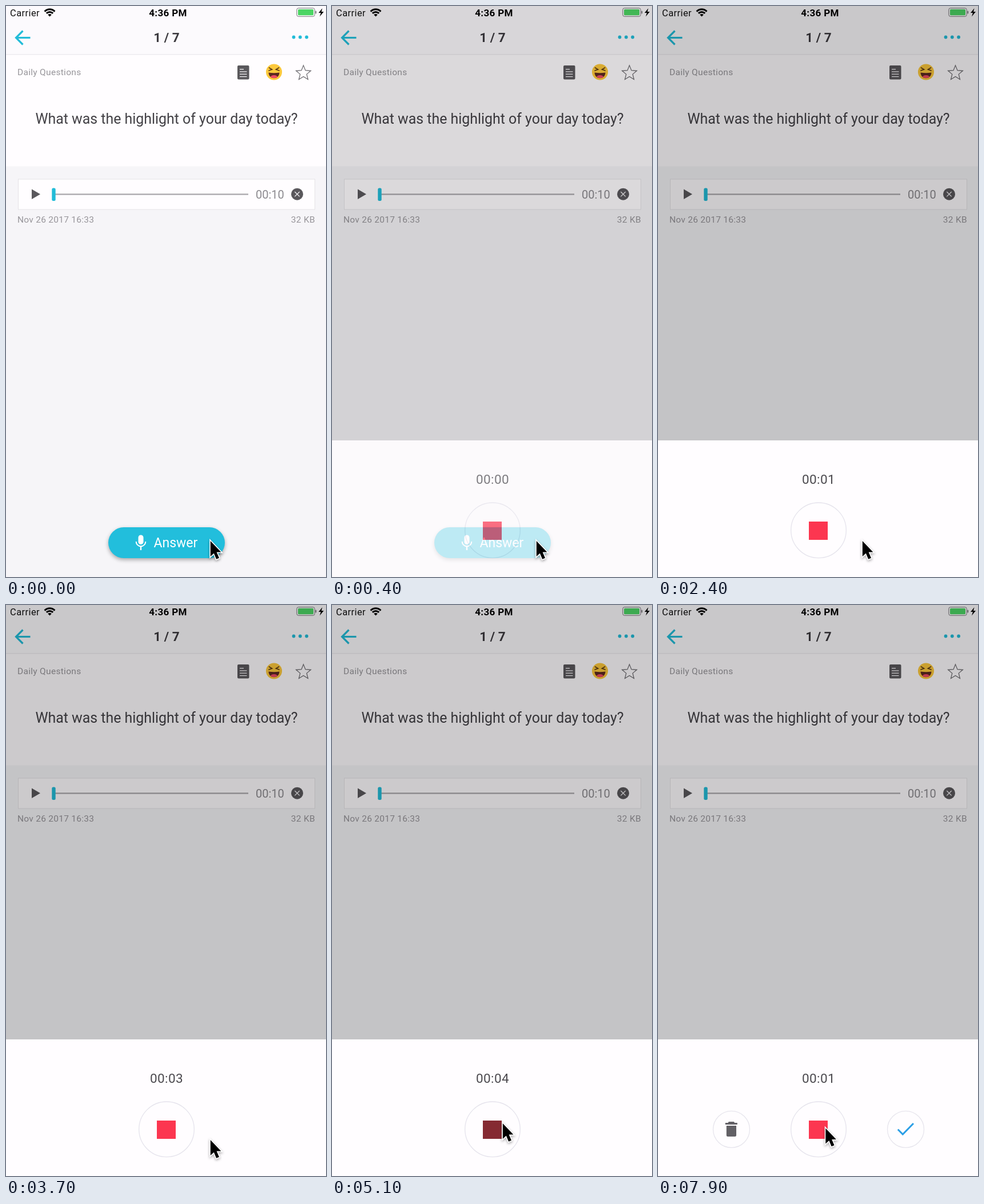
An HTML page with a canvas for the animation above (8000 ms loop, 560 by 999 pixels).

```html
<!DOCTYPE html>
<html lang="en">
<head>
<meta charset="utf-8">
<title>Voice answer</title>
<style>
html, body { margin: 0; width: 100%; height: 100%; overflow: hidden; background: #f6f5f8; }
canvas { display: block; width: 560px; height: 999px; }
</style>
</head>
<body>
<canvas id="stage" width="560" height="999"></canvas>
<script>
const W = 560, H = 999, LOOP = 8000;
const CYAN = '#22bcd8', DARK = '#5a585c', RED = '#fc3650';
const stage = document.getElementById('stage').getContext('2d');

function layer() {
  const el = document.createElement('canvas');
  el.width = W;
  el.height = H;
  return el.getContext('2d');
}
const page = layer(), modal = layer();
let c = page;

function rect(x, y, w, h, color) {
  c.fillStyle = color;
  c.fillRect(x, y, w, h);
}
function round(x, y, w, h, r, color) {
  c.beginPath();
  c.roundRect(x, y, w, h, r);
  c.fillStyle = color;
  c.fill();
}
function disc(x, y, r, color) {
  c.beginPath();
  c.arc(x, y, r, 0, Math.PI * 2);
  c.fillStyle = color;
  c.fill();
}
function ring(x, y, r, color, width) {
  c.beginPath();
  c.arc(x, y, r, 0, Math.PI * 2);
  c.strokeStyle = color;
  c.lineWidth = width;
  c.stroke();
}
function trace(points) {
  c.beginPath();
  points.forEach(([x, y]) => c.lineTo(x, y));
}
function poly(points, color) {
  trace(points);
  c.closePath();
  c.fillStyle = color;
  c.fill();
}
function line(points, color, width) {
  trace(points);
  c.strokeStyle = color;
  c.lineWidth = width;
  c.stroke();
}
function text(str, x, y, size, color, { align = 'left', weight = 400, gap = 0 } = {}) {
  c.font = `${weight} ${size}px Roboto, Inter, sans-serif`;
  c.letterSpacing = gap + 'px';
  c.textAlign = align;
  c.fillStyle = color;
  c.fillText(str, x, y);
}

function statusBar() {
  text('Carrier', 7, 17.5, 16.5, '#111', { gap: 0.4 });
  // wifi
  c.save();
  c.beginPath();
  c.moveTo(76.5, 18.5);
  c.lineTo(60.5, 2.5);
  c.lineTo(92.5, 2.5);
  c.clip();
  ring(76.5, 18, 12.2, '#000', 3);
  ring(76.5, 18, 7.6, '#000', 3);
  disc(76.5, 18, 4, '#000');
  c.restore();
  text('4:36 PM', 283.5, 17.5, 17, '#000', { align: 'center', weight: 600, gap: 0.35 });
  // battery
  c.beginPath();
  c.roundRect(508.8, 3.7, 31.4, 14.6, 3);
  c.strokeStyle = '#77757a';
  c.lineWidth = 1;
  c.stroke();
  round(511, 5.8, 27, 10.4, 1.5, '#4cd564');
  round(541.4, 8.5, 1.8, 5, 1, '#77757a');
  poly([[553.5, 4], [547, 12], [551, 12], [549, 18.5], [556, 10], [552, 10]], '#000');
}

function header() {
  rect(0, 0, W, 85, '#fcfafd');
  rect(0, 84.5, W, 1, '#e2e0e4');
  statusBar();
  line([[42.5, 55.5], [18, 55.5]], CYAN, 3.2);
  line([[29.5, 43.5], [17.5, 55.5], [29.5, 67.5]], CYAN, 3.2);
  text('1 / 7', 281, 63, 22.5, '#3c3a3f', { align: 'center', weight: 600 });
  for (let i = 0; i < 3; i++) disc(503.5 + i * 11.3, 54.5, 2.9, CYAN);
}

function emoji(x, y) {
  disc(x, y, 14, '#fdc93c');
  c.lineCap = 'round';
  for (const s of [-1, 1])
    line([[x + s * 8.5, y - 7.5], [x + s * 3.5, y - 4.5], [x + s * 9, y - 2.5]], '#5b3a16', 1.7);
  c.lineCap = 'butt';
  c.save();
  c.beginPath();
  c.moveTo(x - 9.5, y + 1);
  c.quadraticCurveTo(x, y + 2.5, x + 9.5, y + 1);
  c.bezierCurveTo(x + 9, y + 14, x - 9, y + 14, x - 9.5, y + 1);
  c.fillStyle = '#5c2a20';
  c.fill();
  c.clip();
  c.beginPath();
  c.ellipse(x, y + 10, 6.5, 4.5, 0, 0, Math.PI * 2);
  c.fillStyle = '#ee4a62';
  c.fill();
  c.restore();
}

function star(x, y) {
  const pts = [];
  for (let i = 0; i < 10; i++) {
    const r = i % 2 ? 6 : 13.6, a = i * Math.PI / 5 - Math.PI / 2;
    pts.push([x + r * Math.cos(a), y + r * Math.sin(a)]);
  }
  trace(pts);
  c.closePath();
  c.strokeStyle = '#68666b';
  c.lineWidth = 1.2;
  c.stroke();
}

function question() {
  rect(0, 85.5, W, 195, '#fffdff');
  text('Daily Questions', 20, 121, 15.5, '#97959a', { gap: 0.3 });
  round(405, 104, 20.5, 24.5, 2, DARK);
  [110, 114.3, 118.6, 122.9].forEach((y, i) => rect(409, y, i ? 12.5 : 7, 1.3, '#f4f2f5'));
  emoji(469, 115.5);
  star(520.5, 117.5);
  text('What was the highlight of your day today?', 281, 206, 24.9, '#434146', { align: 'center' });
}

function player() {
  rect(21, 302.5, 520, 54, '#e5e3e7');
  rect(22, 303.5, 518, 52, '#fffdff');
  poly([[45, 320.5], [45, 338], [60, 329.2]], DARK);
  rect(84, 328.3, 340, 2.3, '#aaa8ac');
  round(80.3, 318.5, 6.4, 22.5, 2.5, CYAN);
  text('00:10', 437, 336.5, 20, '#8b898e');
  disc(509.5, 329.2, 10.5, DARK);
  line([[505.3, 325], [513.7, 333.4]], '#f4f2f5', 1.3);
  line([[513.7, 325], [505.3, 333.4]], '#f4f2f5', 1.3);
  text('Nov 26 2017 16:33', 20, 379, 15.5, '#97959a', { gap: 0.27 });
  text('32 KB', 541, 379, 15.5, '#97959a', { align: 'right', gap: 0.3 });
}

function answerButton() {
  c.save();
  c.shadowColor = 'rgba(0,0,0,.32)';
  c.shadowBlur = 7;
  c.shadowOffsetY = 3;
  round(179, 912, 204, 54, 27, '#22bedc');
  c.restore();
  round(231.5, 925.5, 9, 16.5, 4.5, '#fff');
  c.beginPath();
  c.arc(236, 937, 8.3, 0, Math.PI);
  c.strokeStyle = '#fff';
  c.lineWidth = 2;
  c.stroke();
  rect(234.8, 945, 2.4, 7, '#fff');
  text('Answer', 258.5, 947, 23, '#fff');
}

function drawPage() {
  c = page;
  rect(0, 0, W, H, '#f6f5f8');
  header();
  question();
  player();
  answerButton();
}

function sideButtons(alpha) {
  c.globalAlpha = alpha;
  for (const x of [128.5, 433.5]) ring(x, 917.3, 32, '#e7e5ed', 1.3);
  round(122.8, 904, 11, 4, 1.5, '#626065');
  rect(117.8, 906, 21, 3, '#626065');
  round(119.8, 911, 17.2, 19, [0, 0, 2.5, 2.5], '#626065');
  line([[419.8, 917.5], [428.3, 926], [447, 907]], '#2c9fe6', 3);
  c.globalAlpha = 1;
}

const clamp = v => Math.max(0, Math.min(1, v));
const ramp = (t, from, to) => clamp((t - from) / (to - from));
const ease = p => p * p * (3 - 2 * p);

const REC = 620, STOPPED = 5200, PLAY = 6800;

function seconds(t) {
  if (t < PLAY) return Math.min(4, Math.max(0, Math.floor((t - REC) / 1000)));
  return Math.floor((t - PLAY) / 1000);
}

function drawModal(t) {
  c = modal;
  c.clearRect(0, 0, W, H);
  rect(0, 0, W, 760, 'rgba(0,0,0,.2)');
  rect(0, 760, W, H - 760, '#fffdff');
  text('00:0' + seconds(t), 281, 836, 22.5, '#4b494e', { align: 'center', gap: 0.4 });
  ring(281, 917.3, 48.3, '#e5e3ec', 1.3);
  if (t >= STOPPED && t < PLAY) {
    const color = t >= 6700 ? '#414043' : '#69676b';
    poly([[267, 901], [267, 934], [294, 917.5]], color);
  } else {
    const pressed = t >= 5000 && t < STOPPED;
    rect(264, 902, 33, 32, pressed ? '#852a32' : RED);
  }
  if (t >= STOPPED) sideButtons(ramp(t, STOPPED - 50, STOPPED + 100));
}

const ARROW = [[0, 0], [0, 27], [6, 21.5], [10.3, 31.8], [15.2, 29.7], [10.8, 19.6], [18.6, 19.6]];

function cursor(t) {
  const a = ease(ramp(t, 4000, 4600)), b = ease(ramp(t, 6350, 6550));
  c = stage;
  c.save();
  c.translate(357.8 - 59 * a - 5.5 * b, 936 - 29 * a + 8.5 * b);
  c.lineJoin = 'miter';
  c.shadowColor = 'rgba(0,0,0,.35)';
  c.shadowBlur = 4;
  c.shadowOffsetY = 2;
  trace(ARROW);
  c.closePath();
  c.strokeStyle = '#fff';
  c.lineWidth = 3.2;
  c.stroke();
  c.shadowColor = 'transparent';
  poly(ARROW, '#000');
  c.restore();
}

function frame(now) {
  const t = now % LOOP;
  const shown = ramp(t, 190, 490);
  stage.drawImage(page.canvas, 0, 0);
  if (shown > 0) {
    drawModal(t);
    stage.globalAlpha = shown;
    stage.drawImage(modal.canvas, 0, 0);
    stage.globalAlpha = 1;
  }
  cursor(t);
}

let start = null;
function tick(now) {
  if (start === null) start = now;
  frame(now - start);
  requestAnimationFrame(tick);
}
drawPage();
frame(0);
requestAnimationFrame(tick);
</script>
</body>
</html>
```
